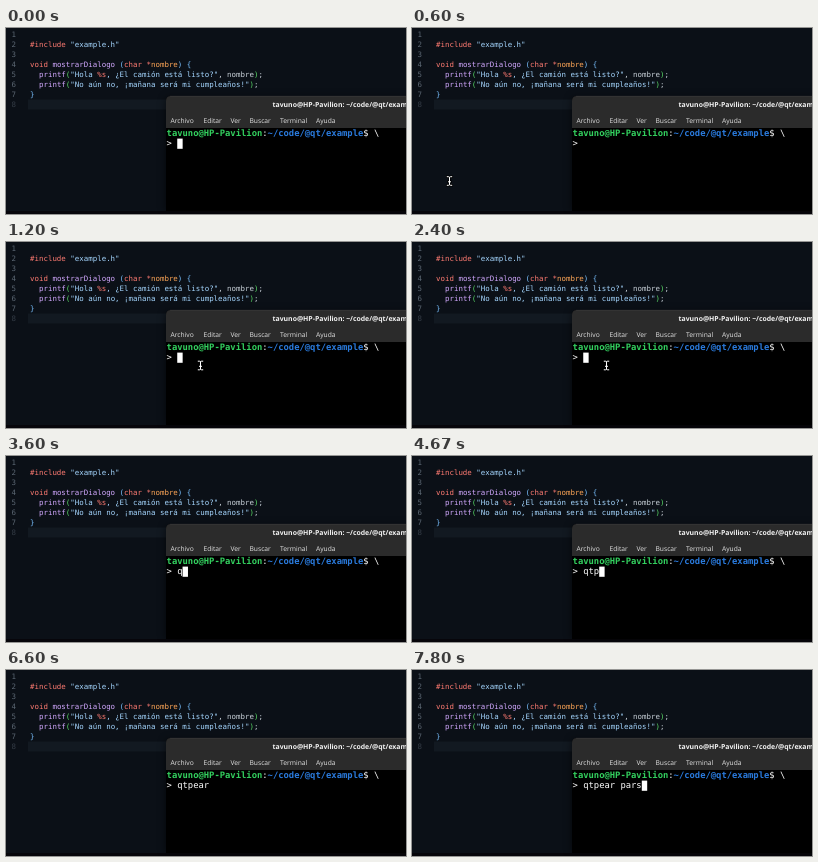
An HTML page for the animation above (8000 ms loop, 400x186 px).

```html
<!DOCTYPE html>
<html lang="es">
<head>
<meta charset="utf-8">
<title>Editor y terminal</title>
<style>
  html, body { margin: 0; width: 100%; height: 100%; overflow: hidden; background: #0b1017; }
  svg { display: block; width: 100vw; height: 100vh; }
  text { white-space: pre; text-rendering: geometricPrecision; }
  .code { font: 7.44px "DejaVu Sans Mono", monospace; fill: #c9d1d9; }
  .shell { font: 8.84px "DejaVu Sans Mono", monospace; fill: #fff; }
  .ui { font: 6.7px "Open Sans", sans-serif; fill: #e4e4e4; }
  .title { font-weight: 700; font-size: 6.9px; fill: #f2f2f2; }
  .num { fill: #5c6773; }
  .key { fill: #ff7b72; }
  .fn { fill: #d2a8ff; }
  .str { fill: #a5d6ff; }
  .arg { fill: #ffa657; }
  .outer { fill: #79c0ff; }
  .inner { fill: #56d364; }
  .user { fill: #33d15f; font-weight: 700; }
  .path { fill: #2a7bde; font-weight: 700; }
</style>
</head>
<body>
<svg viewBox="0 0 400 186" preserveAspectRatio="none">
  <defs>
    <filter id="shadow" x="-10%" y="-20%" width="120%" height="140%"><feGaussianBlur stdDeviation="4"/></filter>
  </defs>
  <rect width="400" height="186" fill="#0b1017"/>
  <rect x="22" y="71.5" width="378" height="10" fill="#121921"/>
  <g id="editor" class="code"></g>
  <rect y="183" width="400" height="3" fill="#07060b"/>

  <rect x="160" y="70" width="250" height="113" fill="#000" opacity=".6" filter="url(#shadow)"/>
  <path d="M160 183V73q0-5 5-5H400V183Z" fill="#000"/>
  <path d="M160 100V73q0-5 5-5H400V100Z" fill="#2b2b2b"/>
  <path d="M164 68.3H400" stroke="#3d3d3d" stroke-width=".6"/>
  <text class="ui title" x="266.5" y="79.2">tavuno@HP-Pavilion: ~/code/@qt/example</text>
  <g id="menu" class="ui"></g>
  <text class="shell" x="160.6" y="108.2"><tspan class="user">tavuno@HP-Pavilion</tspan>:<tspan class="path">~/code/@qt/example</tspan>$ \</text>
  <text id="input" class="shell" x="160.6" y="118.4"></text>
  <rect id="caret" y="110.6" width="5.4" height="10.2" fill="#fff"/>

  <g id="pointer" fill="none" stroke-linecap="square">
    <path id="beam" d="M-2.2-4.3H-1Q0-4.3 0-3.3Q0-4.3 1-4.3H2.2M0-3.3V3.3M-2.2 4.3H-1Q0 4.3 0 3.3Q0 4.3 1 4.3H2.2M-1 .8H1" stroke="#000" stroke-width="2.4"/>
    <use href="#beam" id="beamCore"/>
    <path d="M-2.2-4.3H-1Q0-4.3 0-3.3Q0-4.3 1-4.3H2.2M0-3.3V3.3M-2.2 4.3H-1Q0 4.3 0 3.3Q0 4.3 1 4.3H2.2M-1 .8H1" stroke="#fff" stroke-width="1"/>
  </g>
</svg>
<script>
const LOOP = 8000, FRAME = 200 / 3, BLINK = 600;
const CELL = 5.322, SHELL_X = 160.6;
const byId = id => document.getElementById(id);
byId('beamCore').remove();

// Each source line is a list of [text, class] runs.
const printf = (...runs) => [['  '], ['printf', 'fn'], ['(', 'inner'], ...runs, [')', 'inner'], [';']];
const lines = [
  [],
  [['#include', 'key'], [' '], ['"example.h"', 'str']],
  [],
  [['void', 'key'], [' '], ['mostrarDialogo', 'fn'], [' '], ['(', 'outer'], ['char', 'key'], [' '],
    ['*', 'key'], ['nombre', 'arg'], [')', 'outer'], [' '], ['{', 'outer']],
  printf(['"Hola ', 'str'], ['%s', 'key'], [', ¿El camión está listo?"', 'str'], [', nombre']),
  printf(['"No aún no, ¡mañana será mi cumpleaños!"', 'str']),
  [['}', 'outer']],
  []
];
byId('editor').innerHTML = lines.map((runs, i) => {
  const y = 8.8 + i * 10.06;
  const body = runs.map(([text, cls = '']) => `<tspan class="${cls}">${text}</tspan>`).join('');
  return `<text class="num" x="5.5" y="${y}"${i === 7 ? ' opacity=".5"' : ''}>${i + 1}</text>` +
    `<text x="24" y="${y}">${body}</text>`;
}).join('');

const menu = { Archivo: 164.5, Editar: 197.5, Ver: 224.5, Buscar: 243.5, Terminal: 274, Ayuda: 310 };
byId('menu').innerHTML = Object.entries(menu)
  .map(([label, x]) => `<text x="${x}" y="95.2">${label}</text>`).join('');

const typed = 'qtpear pars';
const keyTimes = [3600, 3670, 4330, 4730, 5070, 5400, 6000, 6730, 7070, 7270, 7670];
const IDLE_BLINK_START = -330;

// Pointer waypoints: time, x, y
const route = [
  [70, 350, 24], [330, 150, 110], [470, 66, 176], [600, 37.5, 153],
  [870, 73, 98], [1200, 194.5, 123.5]
];
const POINTER_SHOWN = 70, POINTER_HIDDEN = 3330;

function pointerAt(t) {
  const next = route.findIndex(p => p[0] > t);
  if (next < 0) return route[route.length - 1].slice(1);
  const a = route[Math.max(0, next - 1)], b = route[next];
  const u = Math.max(0, (t - a[0]) / (b[0] - a[0]));
  const s = u * u * (3 - 2 * u);
  return [a[1] + (b[1] - a[1]) * s, a[2] + (b[2] - a[2]) * s];
}

function draw(t) {
  const count = keyTimes.filter(k => k <= t).length;
  const blinkStart = count ? keyTimes[count - 1] : IDLE_BLINK_START;
  const lit = Math.floor((t - blinkStart) / BLINK) % 2 === 0;
  byId('input').textContent = '> ' + typed.slice(0, count);
  byId('caret').setAttribute('x', SHELL_X + (2 + count) * CELL);
  byId('caret').setAttribute('visibility', lit ? 'visible' : 'hidden');

  const shown = t >= POINTER_SHOWN && t < POINTER_HIDDEN;
  byId('pointer').setAttribute('visibility', shown ? 'visible' : 'hidden');
  byId('pointer').setAttribute('transform', `translate(${pointerAt(t)})`);
}

// The screen refreshes 15 times a second, on times rounded to 10 ms.
function tick() {
  const t = performance.now() % LOOP;
  draw(Math.round(Math.floor((t + 4) / FRAME) * FRAME / 10) * 10);
  requestAnimationFrame(tick);
}
tick();
</script>
</body>
</html>
```
